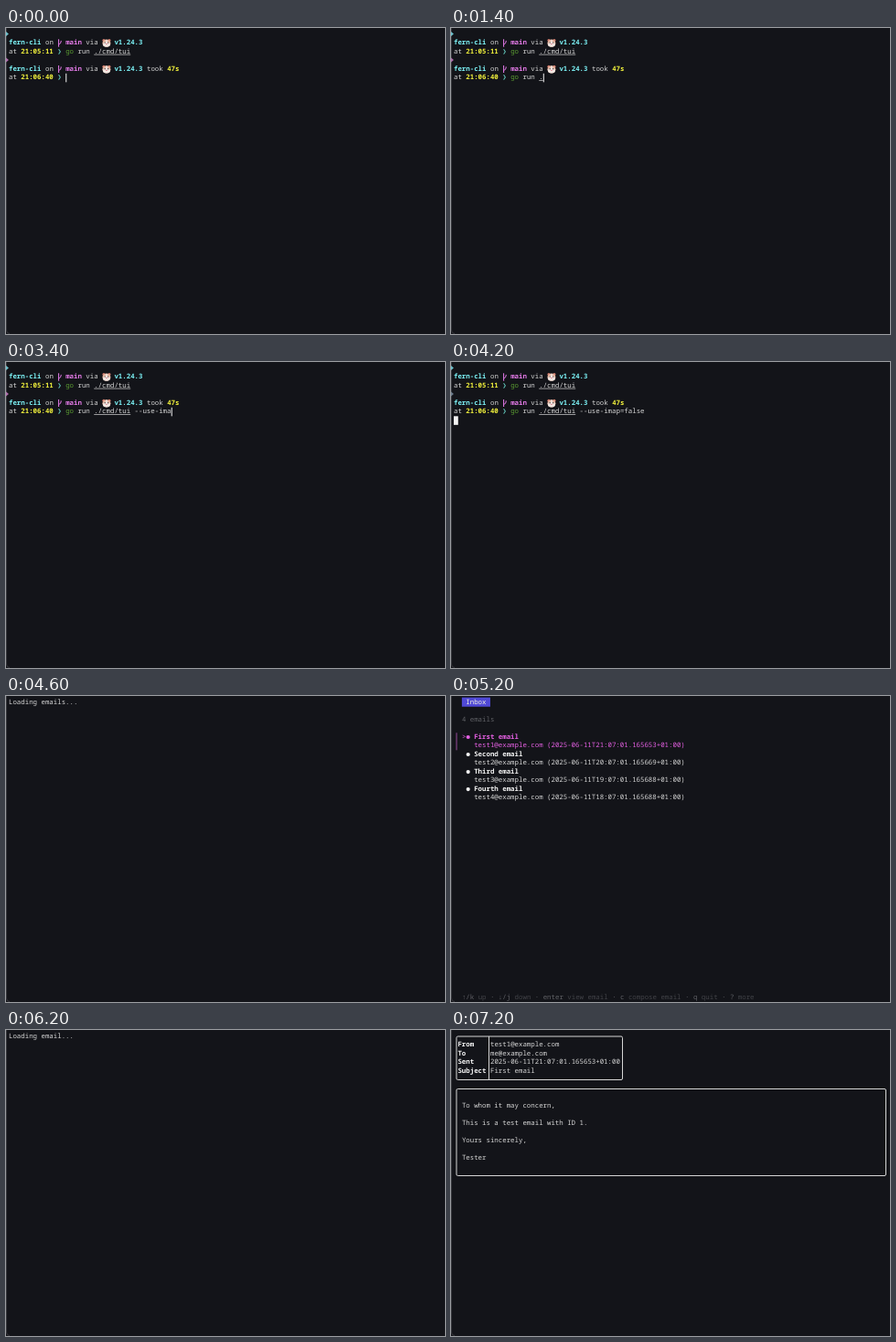
An HTML page for the animation above (8000 ms loop, 480 by 335 pixels).

```html
<!DOCTYPE html>
<html lang="en">
<head>
<meta charset="utf-8">
<title>Terminal mail client</title>
<style>
  html, body { margin: 0; width: 100%; height: 100%; overflow: hidden; background: #131419; }
  svg { display: block; width: 100%; height: 100%; }
  text {
    font: 7.4px "Noto Sans Mono", "DejaVu Sans Mono", monospace;
    white-space: pre;
    text-rendering: geometricPrecision;
  }
  .bold { font-weight: 700; }
</style>
</head>
<body>
<svg id="stage" viewBox="0 0 480 335"></svg>
<script>
const LOOP = 8000;
const CELL = 4.44, ROW = 9.52, LEFT = 3, TOP = 2.2;
const INK = '#d6d6d6', WHITE = '#f4f4f4', CYAN = '#7cf2f6', MAGENTA = '#e27ae6',
      YELLOW = '#f0f03c', GREEN = '#5c9e33', PROMPT = '#62c8bd', PINK = '#e560e3',
      DIM = '#606166', FAINT = '#424348';

const stage = document.getElementById('stage');
const colX = col => LEFT + col * CELL;
const rowY = row => TOP + row * ROW;

function add(parent, tag, attrs = {}) {
  const node = document.createElementNS('http://www.w3.org/2000/svg', tag);
  for (const [key, value] of Object.entries(attrs)) node.setAttribute(key, value);
  return parent.appendChild(node);
}

function write(parent, row, col, string, fill = INK, bold = false) {
  const node = add(parent, 'text', { x: colX(col), y: rowY(row) + 6.5, fill });
  if (bold) node.setAttribute('class', 'bold');
  node.textContent = string;
  return node;
}

const rect = (parent, x, y, width, height, fill) =>
  add(parent, 'rect', { x, y, width, height, fill });

const underline = (parent, row, col, count) =>
  rect(parent, colX(col), rowY(row) + 7.5, count * CELL, 0.7, INK);

const frame = (parent, x, y, width, height) =>
  add(parent, 'rect', { x, y, width, height, rx: 1.5, fill: 'none', stroke: INK });

// Window edge with its rounded lower corner
rect(stage, 0, 0, 480, 335, '#131419');
add(stage, 'path', { d: 'M.5 0V331Q.5 334.5 4 334.5', fill: 'none', stroke: '#36373c' });

const scenes = {};
for (const name of ['shell', 'fetch', 'inbox', 'open', 'message'])
  scenes[name] = add(stage, 'g');

// Shell
const shell = scenes.shell;

function branchIcon(row) {
  const g = add(shell, 'g', {
    transform: `translate(${colX(12)} ${rowY(row)})`,
    fill: 'none', stroke: MAGENTA, 'stroke-width': 1
  });
  add(g, 'path', { d: 'M1.3 1V8.6M1.3 6.2Q3.9 5.6 3.9 3' });
  for (const [cx, cy] of [[1.3, 1.2], [3.9, 2.6], [1.3, 8.2]])
    add(g, 'circle', { cx, cy, r: 0.6, fill: MAGENTA, stroke: 'none' });
}

function hamster(row) {
  const g = add(shell, 'g', { transform: `translate(${colX(23) + 4.8} ${rowY(row) + 4.8})` });
  const blob = (cx, cy, rx, ry, fill) => add(g, 'ellipse', { cx, cy, rx, ry, fill });
  for (const side of [-1, 1]) blob(side * 3, -2.9, 1.5, 1.5, '#d77f70');
  blob(0, 0.2, 4.5, 4.1, '#e6b8a4');
  blob(0, 1.6, 4, 2.7, '#f2e7e2');
  blob(0, -1.8, 0.9, 2, '#f2e7e2');
  for (const side of [-1, 1]) blob(side * 1.8, -0.4, 0.6, 0.7, '#382a2c');
  blob(0, 1.1, 0.8, 0.5, '#d65d74');
}

function prompt(row, time, took) {
  write(shell, row, 0, 'fern-cli', CYAN, true);
  write(shell, row, 9, 'on');
  branchIcon(row);
  write(shell, row, 14, 'main', MAGENTA, true);
  write(shell, row, 19, 'via');
  hamster(row);
  write(shell, row, 26, 'v1.24.3', CYAN, true);
  if (took) {
    write(shell, row, 34, 'took');
    write(shell, row, 39, took, YELLOW, true);
  }
  write(shell, row + 1, 0, 'at');
  write(shell, row + 1, 3, time, YELLOW, true);
  write(shell, row + 1, 12, '❯', PROMPT, true);
}

const marker = (y, fill) =>
  add(shell, 'path', { d: `M0 ${y - 2.5}L3 ${y}L0 ${y + 2.5}Z`, fill });

marker(6.5, '#6fc3cf');
const promptMark = marker(35, '#b06fae');
prompt(1, '21:05:11');
write(shell, 2, 14, 'go', GREEN);
write(shell, 2, 17, 'run');
write(shell, 2, 21, './cmd/tui');
underline(shell, 2, 21, 9);
prompt(4, '21:06:40', '47s');

const COMMAND = 'go run ./cmd/tui --use-imap=false';
const typedGo = write(shell, 5, 14, '', GREEN);
const typedRest = write(shell, 5, 16, '');
const typedLine = underline(shell, 5, 21, 0);
const caret = rect(shell, 0, rowY(5), 1, ROW, WHITE);
const block = rect(shell, LEFT, rowY(6), 4.8, ROW, WHITE);

// Mail list
const inbox = scenes.inbox;
write(scenes.fetch, 0, 0, 'Loading emails...');
rect(inbox, colX(2), 1.6, CELL * 7, 10.1, '#5049d6');
write(inbox, 0, 3, 'Inbox', '#f4f4dc');
write(inbox, 2, 2, '4 emails', DIM);
rect(inbox, 5.6, rowY(4), 0.9, ROW * 2, '#a650a8');
write(inbox, 4, 2, '>', PINK);
['First', 'Second', 'Third', 'Fourth'].forEach((name, i) => {
  const row = 4 + i * 2, fill = i ? WHITE : PINK;
  const micros = ['165653', '165669', '165688', '165688'][i];
  add(inbox, 'circle', { cx: colX(3) + 2.4, cy: rowY(row) + 4.7, r: 2.1, fill });
  write(inbox, row, 5, `${name} email`, fill, true);
  write(inbox, row + 1, 5,
    `test${i + 1}@example.com (2025-06-11T${21 - i}:07:01.${micros}+01:00)`, i ? INK : PINK);
});

let helpCol = 2;
const hints = [['↑/k', 'up'], ['↓/j', 'down'], ['enter', 'view email'],
               ['c', 'compose email'], ['q', 'quit'], ['?', 'more']];
hints.forEach(([key, action], i) => {
  if (i) write(inbox, 34, helpCol - 2, '·', DIM);
  write(inbox, 34, helpCol, key, DIM);
  write(inbox, 34, helpCol + key.length + 1, action, FAINT);
  helpCol += key.length + action.length + 4;
});

// Single mail
write(scenes.open, 0, 0, 'Loading email...');
const message = scenes.message;
frame(message, 6, 7, 181.5, 47.5);
rect(message, 41, 7, 1, 47.5, INK);
[['From', 'test1@example.com'], ['To', 'me@example.com'],
 ['Sent', '2025-06-11T21:07:01.165653+01:00'], ['Subject', 'First email']]
  .forEach(([label, value], i) => {
    write(message, i + 1, 1, label, WHITE, true);
    write(message, i + 1, 9, value);
  });
frame(message, 6, 64.5, 469.5, 95);
['To whom it may concern,', 'This is a test email with ID 1.', 'Yours sincerely,', 'Tester']
  .forEach((line, i) => write(message, 8 + i * 2, 2, line));

// Timeline: [start ms, value]
const SCENES = [[0, 'shell'], [4600, 'fetch'], [5200, 'inbox'], [6200, 'open'], [7000, 'message']];
const TYPING = [[0, 0], [600, 1], [800, 2], [1000, 4], [1200, 6], [1400, 8], [1600, 10],
  [1800, 11], [2000, 13], [2200, 14], [2400, 16], [2600, 19], [2800, 20], [3000, 22],
  [3200, 23], [3400, 26], [3600, 28], [3800, 31], [4000, 33]];
const at = (steps, t) => steps.findLast(([start]) => start <= t)[1];

function render(t) {
  const active = at(SCENES, t);
  for (const name in scenes)
    scenes[name].setAttribute('display', name === active ? 'inline' : 'none');

  const count = at(TYPING, t), running = t >= 4200;
  typedGo.textContent = COMMAND.slice(0, Math.min(count, 2));
  typedRest.textContent = COMMAND.slice(2, Math.max(count, 2));
  typedLine.setAttribute('width', CELL * Math.max(0, Math.min(count - 7, 9)));
  caret.setAttribute('x', colX(14 + count) + 0.1);
  caret.setAttribute('display', running ? 'none' : 'inline');
  block.setAttribute('display', running ? 'inline' : 'none');
  promptMark.setAttribute('fill', running ? '#6c7c8c' : '#b06fae');
}

const origin = performance.now();
function tick() {
  render((performance.now() - origin) % LOOP);
  requestAnimationFrame(tick);
}
tick();
</script>
</body>
</html>
```
